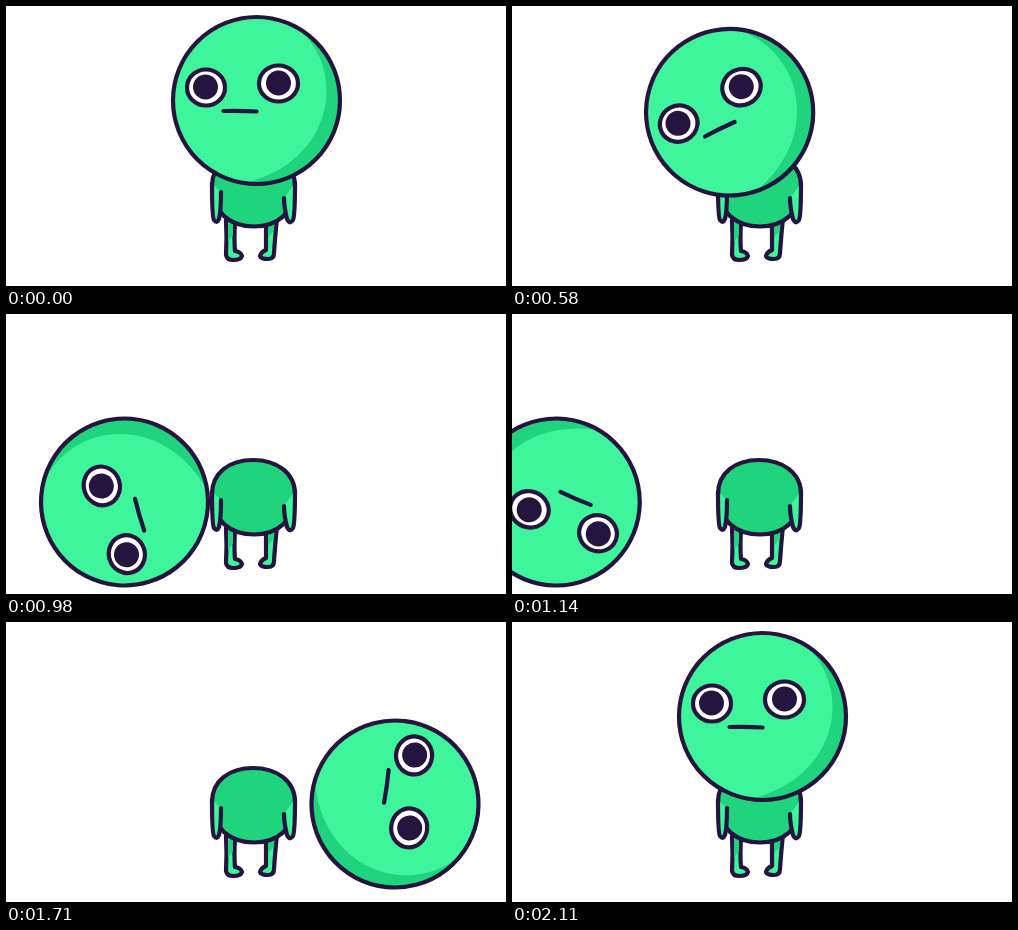
An HTML page that plays this animation: 500x280 px, repeating every 2.19 s.

```html
<!DOCTYPE html>
<html lang="en">
<head>
<meta charset="utf-8">
<title>Rolling head</title>
<style>
  html, body { margin: 0; width: 100%; height: 100%; overflow: hidden; background: #fff; }
  svg { display: block; width: 500px; height: 280px; }
  .ink { stroke: #24143f; stroke-width: 4.2; stroke-linecap: round; stroke-linejoin: round; }
  .ink, .ink * { vector-effect: non-scaling-stroke; }
  .light { fill: #3ef59b; }
  .dark { fill: #1fd47c; }
  .white { fill: #fff; }
  .pupil { fill: #24143f; }
  .line { fill: none; }
</style>
</head>
<body>
<svg viewBox="0 0 500 280">
  <g id="legs">
    <path class="ink light" d="M220 214Q221 232 220 249Q221 254 227 254Q235 254 236 250Q235 246 229 245Q228 235 229 214"/>
    <path class="ink light" d="M260 214Q260 232 260 244Q255 246 254 250Q255 253 262 253Q268 253 268 247Q269 232 271 212"/>
    <path class="dark" d="M222 216H227V229L222 236ZM262 216H268.500L268 224L262 232Z"/>
  </g>
  <g id="torso">
    <path class="ink dark" d="M206 180C206 159 223 146 247 146S289 159 289 180C289 207 271 220.500 248 220.500S206 207 206 180Z"/>
    <path class="ink light" d="M206 178C206 194 206 211 208 214Q211 218 213 213C215 205 215 195 215 186"/>
    <path class="ink light" d="M289 177C289 194 289 210 287 214Q284 219 281 213C279 205 278 198 278 192"/>
  </g>
  <g id="head">
    <circle class="light" r="83.500"/>
    <path class="dark" d="M42 -72C92 -28 76 62 -12 82.500A83.500 83.500 0 0 0 42 -72Z"/>
    <circle class="ink line" r="83.500"/>
    <g id="face">
      <ellipse class="ink white" cx="-50.500" cy="-13" rx="19" ry="18"/>
      <circle class="pupil" cx="-51" cy="-13.500" r="12.500"/>
      <ellipse class="ink white" cx="22" cy="-17" rx="19.500" ry="18"/>
      <circle class="pupil" cx="22" cy="-17.500" r="12.500"/>
      <path class="ink line" d="M-33 10.500Q-16 10 0 11"/>
    </g>
  </g>
</svg>
<script>
  const LOOP = 2190, STEP = 80, RADIUS = 84;
  const FALL = 500, LAND = 740, ROLL_OFF = 980, GONE = 1300;
  const RETURN = 1470, CLIMB = 1710, HOME = 2110;
  const rest = { x: 250.5, y: 94.5, angle: 0 };
  const head = document.getElementById("head");

  const mix = (from, to, amount) => from + (to - from) * amount;
  const progress = (time, from, to) => Math.min(1, (time - from) / (to - from));
  const smooth = u => u * u * (3 - 2 * u);
  const rollAngle = distance => distance / RADIUS * 180 / Math.PI;
  const hold = (time, start) => start + Math.floor((time - start) / STEP) * STEP;

  function topple(u) {
    const s = smooth(u);
    return { x: mix(242, 148, s), y: mix(94.5, 200, u * u), angle: mix(-5, -90, s), squash: u ** 4 };
  }

  function settle(u) {
    const left = (1 - u) ** 3;
    return { x: mix(148, 118.5, u), y: mix(187, 200, left), angle: mix(-90, -107, u), squash: left };
  }

  function rollOff(u) {
    const distance = -210 * u ** 1.5;
    return { x: 118.5 + distance, y: 188, angle: -107 + rollAngle(distance) };
  }

  function rollBack(u) {
    const distance = 166 * (1 - u);
    return { x: 389 + distance, y: mix(190, 182, u * u), angle: 97 + rollAngle(distance) };
  }

  // The head swings over the shoulder along a quarter ellipse.
  function climb(u) {
    const s = smooth(u), turn = s * Math.PI / 2;
    return {
      x: mix(rest.x, 389, Math.cos(turn)),
      y: mix(182, rest.y, Math.sin(turn)),
      angle: 97 * (1 - s)
    };
  }

  function poseAt(time) {
    if (time < FALL) return rest;
    if (time < GONE) {
      const t = hold(time, FALL);
      if (t < LAND) return topple(progress(t, FALL, LAND));
      if (t < ROLL_OFF) return settle(progress(t, LAND, ROLL_OFF));
      return rollOff(progress(t, ROLL_OFF, GONE));
    }
    if (time < RETURN) return null;
    const t = hold(time, RETURN);
    return t < CLIMB ? rollBack(progress(t, RETURN, CLIMB)) : climb(progress(t, CLIMB, HOME));
  }

  function draw(time) {
    const pose = poseAt(time % LOOP);
    head.style.display = pose ? "" : "none";
    if (!pose) return;
    const { x, y, angle, squash = 0 } = pose;
    head.setAttribute("transform",
      `translate(${x} ${y}) scale(${1 + 0.09 * squash} ${1 - 0.23 * squash}) rotate(${angle})`);
  }

  const start = performance.now();
  function tick() {
    draw(performance.now() - start);
    requestAnimationFrame(tick);
  }
  tick();
</script>
</body>
</html>
```
